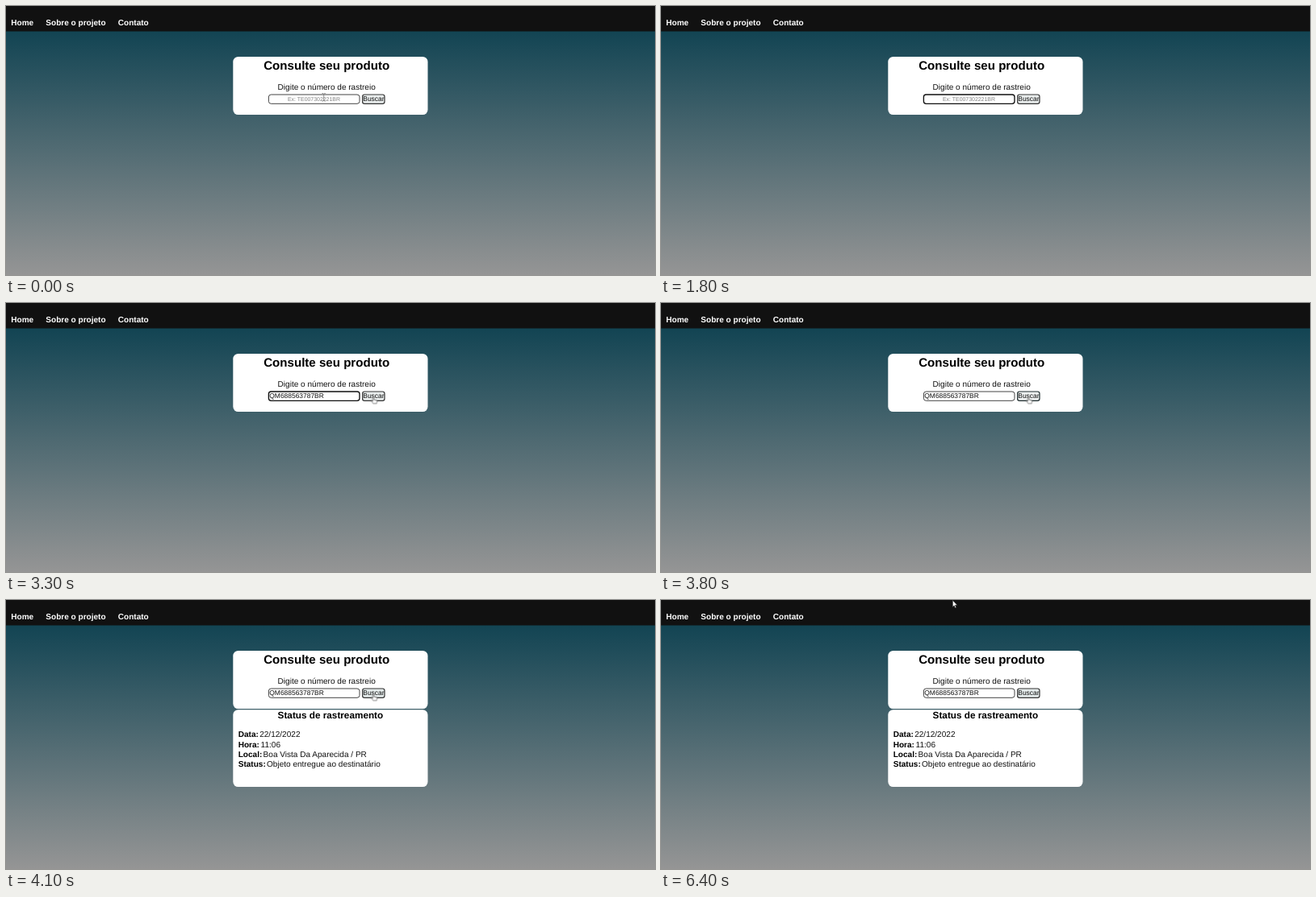
An HTML page for the animation above (7400 ms loop, 804 px wide and 334 px high).

```html
<!DOCTYPE html>
<html lang="pt-BR">
<head>
<meta charset="utf-8">
<title>Consulte seu produto</title>
<style>
  html, body { margin: 0; width: 100%; height: 100%; overflow: hidden; background: #111; }
  svg { display: block; width: 804px; height: 334px; }
  text {
    font: 10.05px "Liberation Sans", Arial, sans-serif;
    fill: #111;
    text-rendering: geometricPrecision;
  }
  .b { font-weight: bold; fill: #000; }
  .nav text { font-weight: bold; fill: #fff; }
  .title { font-size: 15.1px; }
  .subtitle { font-size: 11.75px; }
  .field { font-size: 8.45px; }
  .hint { font-size: 6.93px; fill: #808080; }
  .card { fill: #fff; }
  .caret { stroke: #111; stroke-width: .7; }

  .t { animation: 7.4s step-end infinite; }
  .beam { animation-name: beam; }
  .hint { animation-name: hint; }
  .code { animation-name: code; }
  .caret1 { animation-name: caret1; }
  .caret2 { animation-name: caret2; }
  .input { animation-name: focus; }
  .button { animation-name: press; }
  .result { animation-name: result; }
  .hand { animation-name: hand; }
  .arrow { animation-name: arrow; }
  .move { animation: move 7.4s infinite; }

  @keyframes beam { 0% { opacity: 1 } 1.351%, 100% { opacity: 0 } }
  @keyframes hint { 0% { opacity: 1 } 32.432%, 100% { opacity: 0 } }
  @keyframes code { 0% { opacity: 0 } 32.432%, 100% { opacity: 1 } }
  @keyframes caret1 { 0% { opacity: 0 } 17.568% { opacity: 1 } 24.324%, 100% { opacity: 0 } }
  @keyframes caret2 { 0% { opacity: 0 } 32.432% { opacity: 1 } 40.541%, 100% { opacity: 0 } }
  @keyframes focus {
    0% { stroke: #444; stroke-width: 1 }
    17.568% { stroke: #101010; stroke-width: 1.35 }
    47.297%, 100% { stroke: #444; stroke-width: 1 }
  }
  @keyframes press {
    0% { fill: #e9eded; stroke: #333 }
    47.297% { fill: #dde3e3; stroke: #111 }
    51.351% { fill: #eef1f1; stroke: #1c2a2c }
    54.054%, 100% { fill: #e4ebeb; stroke: #333 }
  }
  @keyframes result { 0% { opacity: 0 } 54.054%, 100% { opacity: 1 } }
  @keyframes hand {
    0% { opacity: 0; transform: translate(450px, 115px) }
    43.243% { opacity: 1; transform: translate(450px, 115px) }
    44.595% { opacity: 1; transform: translate(454.5px, 116.5px) }
    78.378%, 100% { opacity: 0; transform: translate(454.5px, 116.5px) }
  }
  @keyframes arrow { 0% { opacity: 0 } 78.378%, 100% { opacity: 1 } }
  @keyframes move {
    0%, 78.378% { transform: translate(436px, 90px); animation-timing-function: steps(6, end) }
    86.486%, 100% { transform: translate(361px, 0) }
  }
</style>
</head>
<body>
<svg viewBox="0 0 804 334">
  <defs>
    <linearGradient id="sky" x1="0" y1="0" x2="0" y2="1">
      <stop offset="0" stop-color="#124453"/>
      <stop offset="1" stop-color="#959595"/>
    </linearGradient>
  </defs>
  <rect y="31" width="804" height="303" fill="url(#sky)"/>
  <rect width="804" height="31.5" fill="#111"/>
  <g class="nav">
    <text x="6.3" y="24">Home</text>
    <text x="49.3" y="24">Sobre o projeto</text>
    <text x="138.8" y="24">Contato</text>
  </g>

  <rect class="card" x="281.3" y="63" width="241.2" height="72" rx="6.3"/>
  <text class="b title" x="319.2" y="79">Consulte seu produto</text>
  <text x="336.6" y="104">Digite o número de rastreio</text>

  <rect class="t input" x="325.4" y="110" width="112.6" height="11.3" rx="3" fill="#fff"/>
  <text class="t hint" x="349" y="118">Ex: TE007302221BR</text>
  <text class="t field code" x="326.3" y="118">QM688563787BR</text>
  <path class="t caret caret1" d="M326.6 111.5v7.5"/>
  <path class="t caret caret2" d="M393.8 111.5v7.5"/>

  <rect class="t button" x="441.6" y="110" width="27.4" height="11.3" rx="2.6" stroke-width="1.2"/>
  <text class="field" x="442.3" y="118">Buscar</text>

  <g class="t result">
    <rect class="card" x="281.3" y="136.2" width="241.2" height="95.9" rx="6.3"/>
    <text class="b subtitle" x="336.6" y="147">Status de rastreamento</text>
    <text class="b" x="287.7" y="170.4">Data:</text>
    <text x="314.2" y="170.4">22/12/2022</text>
    <text class="b" x="287.7" y="182.6">Hora:</text>
    <text x="315.6" y="182.6">11:06</text>
    <text class="b" x="287.7" y="194.9">Local:</text>
    <text x="318.6" y="194.9">Boa Vista Da Aparecida / PR</text>
    <text class="b" x="287.7" y="207.1">Status:</text>
    <text x="323" y="207.1">Objeto entregue ao destinatário</text>
  </g>

  <path class="t beam" d="M391.5 108.5h1.5l.7.7.7-.7h1.5M393.7 109.2v8M391.5 118h1.5l.7-.7.7.7h1.5" fill="none" stroke="#777" stroke-width=".8"/>
  <path class="t hand" d="M0 .6q.7-1 1.4 0v3l3.2.8q.8.3.7 1.2l-.6 2.7h-4.4l-2.2-3q0-1 1-.6l.9.8z" fill="#fff" stroke="#444" stroke-width=".65"/>
  <g class="t arrow">
    <path class="move" d="M.3.3v8.4l1.9-1.7 1.3 2.9 1.3-.6-1.3-2.8h2.6z" fill="#fff" stroke="#222" stroke-width=".65"/>
  </g>
</svg>
</body>
</html>
```
